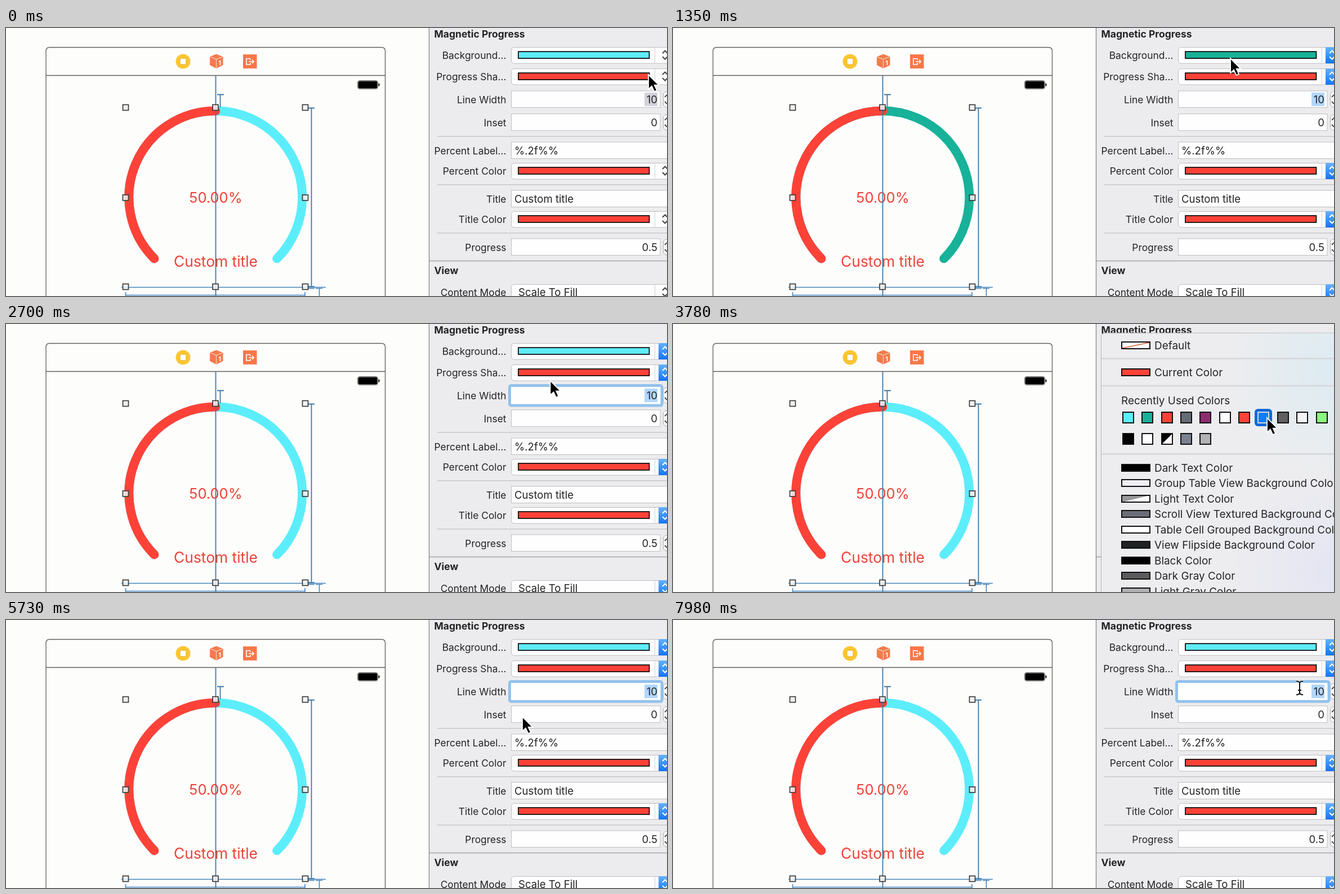
Recreate the animation shown at these times as an HTML page. Size 1174x477 px, loop 8 s.

```html
<!DOCTYPE html>
<html lang="en">
<head>
<meta charset="utf-8">
<title>Progress ring inspector</title>
<style>
html, body { margin: 0; width: 100%; height: 100%; overflow: hidden; background: #fdfdfc; }
svg { display: block; width: 1174px; height: 477px; font-family: Inter, Roboto, sans-serif; }
text { white-space: pre; }
</style>
</head>
<body>
<svg id="stage" viewBox="0 0 1174 477" xmlns="http://www.w3.org/2000/svg">
  <defs>
    <linearGradient id="blue" x2="0" y2="1"><stop stop-color="#69b1fa"/><stop offset="1" stop-color="#1673f3"/></linearGradient>
    <radialGradient id="tint" gradientUnits="userSpaceOnUse" cx="1174" cy="80" r="190">
      <stop stop-color="#dcebf2"/><stop offset="1" stop-color="#dcebf2" stop-opacity="0"/>
    </radialGradient>
    <radialGradient id="tintLow" gradientUnits="userSpaceOnUse" cx="1174" cy="440" r="190">
      <stop stop-color="#e4e5f3"/><stop offset="1" stop-color="#e4e5f3" stop-opacity="0"/>
    </radialGradient>
  </defs>
  <g id="canvas"></g>
  <g id="panel"></g>
  <g id="menu"></g>
  <g id="pointer">
    <path id="arrow" d="M0 0V26L6 20.5 10.3 30 15 28 10.8 18.7H18.5Z" fill="#000" stroke="#fff" stroke-width="1.8"/>
    <g id="beam" fill="none">
      <path d="M-6-12Q0-12 0-8Q0-12 6-12M0-9V9M-6 12Q0 12 0 8Q0 12 6 12M-3 4H3" stroke="#fff" stroke-width="4"/>
      <path d="M-6-12Q0-12 0-8Q0-12 6-12M0-9V9M-6 12Q0 12 0 8Q0 12 6 12M-3 4H3" stroke="#111" stroke-width="2"/>
    </g>
  </g>
</svg>
<script>
const LOOP = 8000, FADE = 260;
const CYAN = '#5cedfb', RED = '#ff4238', TEAL = '#17b299', BLUE = '#107cfa';
const SELECT = '#1368d8', INK = '#242426', WIRE = '#3c78ac';
const $ = id => document.getElementById(id);

const rect = (x, y, w, h, fill, more = '') =>
  `<rect x="${x}" y="${y}" width="${w}" height="${h}" fill="${fill}" ${more}/>`;
const path = (d, stroke, width = 1, more = '') =>
  `<path d="${d}" fill="none" stroke="${stroke}" stroke-width="${width}" ${more}/>`;
const label = (x, mid, str, size = 18.6, anchor = 'start', fill = INK, weight = 400) =>
  `<text x="${x}" y="${mid + size * 0.36}" font-size="${size}" text-anchor="${anchor}" fill="${fill}" font-weight="${weight}">${str}</text>`;
const menuLabel = (x, mid, str, fill = INK) => label(x, mid, str, 18.95, 'start', fill);

// Each menu session: the row it belongs to, open and close times, chosen colour.
const sessions = [
  { row: 48, open: 400, close: 1050, index: 5 },
  { row: 48, open: 1450, close: 1820, index: 1 },
  { row: 86, open: 3000, close: 3860, index: 7 },
  { row: 86, open: 4400, close: 5200, index: 3 }
];
let recent = [CYAN, RED, '#656b77', '#8c2d70', '#fefefe', TEAL, RED, BLUE, '#5f605f', '#f4f4f5', '#8bf77f'];
const now = { 48: CYAN, 86: RED };
for (const s of sessions) {
  s.recent = recent;
  s.current = now[s.row];
  s.pick = recent[s.index];
  now[s.row] = s.pick;
  recent = [s.pick, ...recent.filter((_, i) => i !== s.index)];
}

const track = [
  [0, 1141, 83], [60, 1141, 83], [340, 1000, 52], [470, 1000, 53], [820, 994, 130], [1080, 994, 130],
  [1380, 990, 52], [1500, 990, 52], [1780, 843, 140], [2350, 843, 140], [2850, 1000, 90],
  [3100, 1000, 90], [3600, 1055, 167], [3920, 1055, 167], [4250, 1040, 90], [4500, 1040, 90],
  [4740, 1016, 163], [5100, 917, 172], [6900, 917, 172], [7700, 1113, 121], [LOOP, 1113, 121]
];
function pointerAt(t) {
  const i = Math.max(1, track.findIndex(k => k[0] >= t));
  const [t0, x0, y0] = track[i - 1], [t1, x1, y1] = track[i];
  const u = Math.min(1, Math.max(0, (t - t0) / (t1 - t0))), e = u * u * (3 - 2 * u);
  return [x0 + (x1 - x0) * e, y0 + (y1 - y0) * e];
}

const polar = deg => {
  const a = deg * Math.PI / 180;
  return `${372.3 + 154 * Math.cos(a)} ${301.5 + 154 * Math.sin(a)}`;
};
const arc = (from, to, color) =>
  path(`M${polar(from)}A154 154 0 ${to - from > 180 ? 1 : 0} 1 ${polar(to)}`, color, 16, 'stroke-linecap="round"');

function drawCanvas(back, front) {
  const icons =
    `<circle cx="314.500" cy="59.500" r="13" fill="#fac632"/>` +
    rect(309, 54, 11, 11, '#fff', 'rx="2" stroke="#e5a520" stroke-width="1"') +
    `<path d="M373.500 46.500L385.500 51V66L373.500 72 362 66V51Z" fill="#f47b4d"/>` +
    path('M362 51L373.500 55.500 385.500 51M373.500 55.500V72', '#fbd0bd', 1.2) +
    label(379.5, 62, '1', 11, 'middle', '#fff', 700) +
    rect(421, 47, 24.5, 25, '#f77848') +
    path('M434 54.500H427V65H434V62M434 54.500V57M431 59.700H440M437 56.500L440.200 59.700 437 63', '#fff', 1.6);
  const battery = rect(624.5, 93.5, 36, 15, '#fff', 'rx="3.5" stroke="#666"') +
    rect(625.5, 94.5, 34, 13, '#000', 'rx="2.5"') + rect(661.5, 98.5, 2, 5, '#111', 'rx="1"');
  const wires = path('M372.500 85V477M380.500 118V141M375 118.500H387M542.500 142V461M537 142.500H548', WIRE, 1.8) +
    path('M205 461.500H568M212.500 475.500H531M212.500 470V477M531 470V477M556.500 463V477M550 463.500H562M537 460H548M537 463.500H548', '#4486bd', 1.6);
  const handles = [141.5, 302, 460.5].flatMap(y => [212.5, 372, 531.5].map(x =>
    x === 372 && y === 302 ? '' : rect(x - 5, y - 5, 10, 10, '#f4f4f2', 'fill-opacity=".85" stroke="#3a3a3a" stroke-width="1.7"')));
  return rect(0, 0, 752, 477, '#fdfdfc') +
    path('M71 480V41Q71 34.500 77.500 34.500H667Q673.500 34.500 673.500 41V480M71 84.500H673.500', '#605f59', 1.3) +
    icons + battery + arc(135, 405, back) + arc(135, 270, front) +
    label(372.5, 302, '50.00%', 25.5, 'middle', '#ee4338') +
    label(372.5, 415.5, 'Custom title', 26.4, 'middle', '#ee4338') +
    wires + handles.join('');
}

function popup(y, active, content) {
  const chevrons = path(`M1166 ${y - 3}L1170.500 ${y - 7.5} 1175 ${y - 3}M1166 ${y + 3}L1170.500 ${y + 7.5} 1175 ${y + 3}`, active ? '#fff' : '#444', 2);
  return rect(897.5, y - 13.5, 300, 28.5, '#fefefe', 'rx="5" stroke="#bdbdc2"') +
    path(`M1152.500 ${y - 13}V${y + 14}`, '#d0d0d4') +
    (active ? rect(1159, y - 14, 30, 29, 'url(#blue)') : '') + chevrons + content;
}
const colorPopup = (y, active, color) =>
  popup(y, active, rect(910, y - 6, 232.5, 12, color, 'stroke="#141010" stroke-width="1.8"'));

function field(y, value, wide) {
  const stepper = rect(1167.5, y - 14, 20, 28, '#fefefe', 'rx="6" stroke="#aaaaaf"') +
    path(`M1170 ${y - 4}L1174 ${y - 8}M1170 ${y + 4}L1174 ${y + 8}`, '#444', 1.8);
  return rect(897.5, y - 15, wide ? 290 : 264.5, 29.5, '#fefefe', 'stroke="#bebec4"') +
    (wide ? label(903, y, value) : label(1157, y, value, 18.6, 'end') + stepper);
}

function drawPanel(active, focus, back, front) {
  const names = { 48: 'Background…', 86: 'Progress Sha…', 127: 'Line Width', 168: 'Inset', 218: 'Percent Label…',
    254: 'Percent Color', 304: 'Title', 340: 'Title Color', 390: 'Progress', 470: 'Content Mode' };
  return rect(751, 0, 423, 477, '#ececee') + path('M751.500 0V477', '#8d8d8f', 1.4) +
    label(760.5, 11, 'Magnetic Progress', 17.5, 'start', INK, 700) +
    label(760.5, 431.5, 'View', 17.5, 'start', INK, 700) +
    Object.entries(names).map(([y, s]) => label(888.5, +y + 0.5, s, 17.4, 'end')).join('') +
    path('M766 193H1174M766 279H1174M766 365H1174', '#c8c8cc', 1.3) + path('M752 414.500H1174', '#a5a5a9', 1.4) +
    colorPopup(48, active, back) + colorPopup(86, active, front) +
    colorPopup(254, active, RED) + colorPopup(340, active, RED) +
    popup(470, active, label(910, 470.5, 'Scale To Fill')) +
    field(127, '', false) + field(168, '0', false) + field(390, '0.5', false) +
    field(218, '%.2f%%', true) + field(304, 'Custom title', true) +
    (focus ? rect(894.5, 109.5, 270.5, 35.5, '#fefefe', 'rx="3" stroke="#93c1ec" stroke-width="5"') : '') +
    rect(1134, 115, 23, 24, active ? '#b2d6fc' : '#d3d2da') + label(1157, 127, '10', 18.6, 'end');
}

const half = (x, y, w, h, color) => `<path d="M${x} ${y}H${x + w}L${x} ${y + h}Z" fill="${color}"/>`;
const bar = (y, fill, inner = '') => rect(797, y - 6, 50, 12, fill) + inner +
  rect(797, y - 6, 50, 12, 'none', 'stroke="#101010" stroke-width="2"');

function swatch(i, y, color, hot) {
  const x = Math.round(808 + 34.35 * i);
  const split = color === 'split';
  return (hot ? rect(x - 15, y - 15, 31, 31, SELECT, 'rx="6"') : '') +
    rect(x - 9, y - 9, 19, 19, split ? '#fff' : color) +
    (split ? half(x - 9, y - 9, 19, 19, '#000') : '') +
    rect(x - 9, y - 9, 19, 19, 'none', `stroke="${hot ? '#d3dade' : '#101010'}" stroke-width="2"`);
}

function drawMenu(s, hover) {
  const top = s.row - 70, y0 = s.row;
  const list = [['Dark Text', '#000'], ['Group Table View Background', '#efeff4'], ['Light Text', '#fff'],
    ['Scroll View Textured Background', '#6b6e78'], ['Table Cell Grouped Background', '#fff'],
    ['View Flipside Background', '#1f2125'], ['Black', '#000'], ['Dark Gray', '#5b5b5c'],
    ['Light Gray', '#b1b1b4'], ['White', '#fff']];
  const shape = `x="760.500" y="${top}" width="460" height="600" rx="7"`;
  const rule = y => path(`M761 ${y}H1174`, '#d6d6da', 2.4);
  const onCurrent = hover === 'current';
  return `<rect ${shape} fill="#ededef" stroke="#b4b4b8"/>` +
    (s.row === 86 ? `<rect ${shape} fill="url(#tint)"/>` : '') + `<rect ${shape} fill="url(#tintLow)"/>` +
    bar(y0 - 48, '#fff', path(`M798 ${y0 - 43}L846 ${y0 - 53}`, '#e0603c', 1.3)) + menuLabel(855, y0 - 48, 'Default') +
    rule(y0 - 24.5) +
    (onCurrent ? rect(761, y0 - 14, 413, 28, SELECT) : '') +
    bar(y0, s.current) + menuLabel(855, y0, 'Current Color', onCurrent ? '#fff' : INK) +
    rule(y0 + 24) + menuLabel(796, y0 + 50, 'Recently Used Colors') +
    s.recent.map((c, i) => swatch(i, y0 + 80, c, hover === i)).join('') +
    ['#000', '#fefefe', 'split', '#7b8190', '#b2b2b3'].map((c, i) => swatch(i, y0 + 118, c, false)).join('') +
    rule(y0 + 145.5) +
    list.map(([name, c], i) => {
      const y = Math.round(y0 + 170 + 27.45 * i);
      return bar(y, c, i === 2 ? half(797, y - 6, 50, 12, '#98989b') : '') + menuLabel(855, y, name + ' Color');
    }).join('');
}

function hoverAt(s, t) {
  if (t >= s.close) return s.index;
  const [x, y] = pointerAt(Math.max(s.open, t - 90));
  if (Math.abs(y - s.row) < 14) return 'current';
  if (Math.abs(y - s.row - 80) > 17) return -1;
  return Math.round((x - 808) / 34.35);
}

// Rebuilds a group only when its describing state changes.
const last = {};
function show(id, draw, ...state) {
  const key = state.map(v => v && v.open ? v.open : v).join('|');
  if (last[id] === key) return;
  last[id] = key;
  $(id).innerHTML = draw(...state);
}

function render(t) {
  const colors = { 48: CYAN, 86: RED };
  for (const s of sessions) if (t >= s.close + FADE) colors[s.row] = s.pick;
  const open = sessions.find(s => t >= s.open && t < s.close + FADE);

  show('canvas', drawCanvas, colors[48], colors[86]);
  show('panel', drawPanel, t >= 380, t >= 2100, colors[48], colors[86]);
  if (open) show('menu', drawMenu, open, hoverAt(open, t));
  $('menu').style.display = open ? '' : 'none';
  $('menu').style.opacity = open ? Math.min(1, 1 - (t - open.close) / FADE) : 0;

  const [x, y] = pointerAt(t);
  $('pointer').setAttribute('transform', `translate(${x} ${y})`);
  const typing = t > 7000 && y < 147;
  $('arrow').style.display = typing ? 'none' : '';
  $('beam').style.display = typing ? '' : 'none';
}

const start = performance.now();
function tick() {
  render((performance.now() - start) % LOOP);
  requestAnimationFrame(tick);
}
tick();
</script>
</body>
</html>
```
